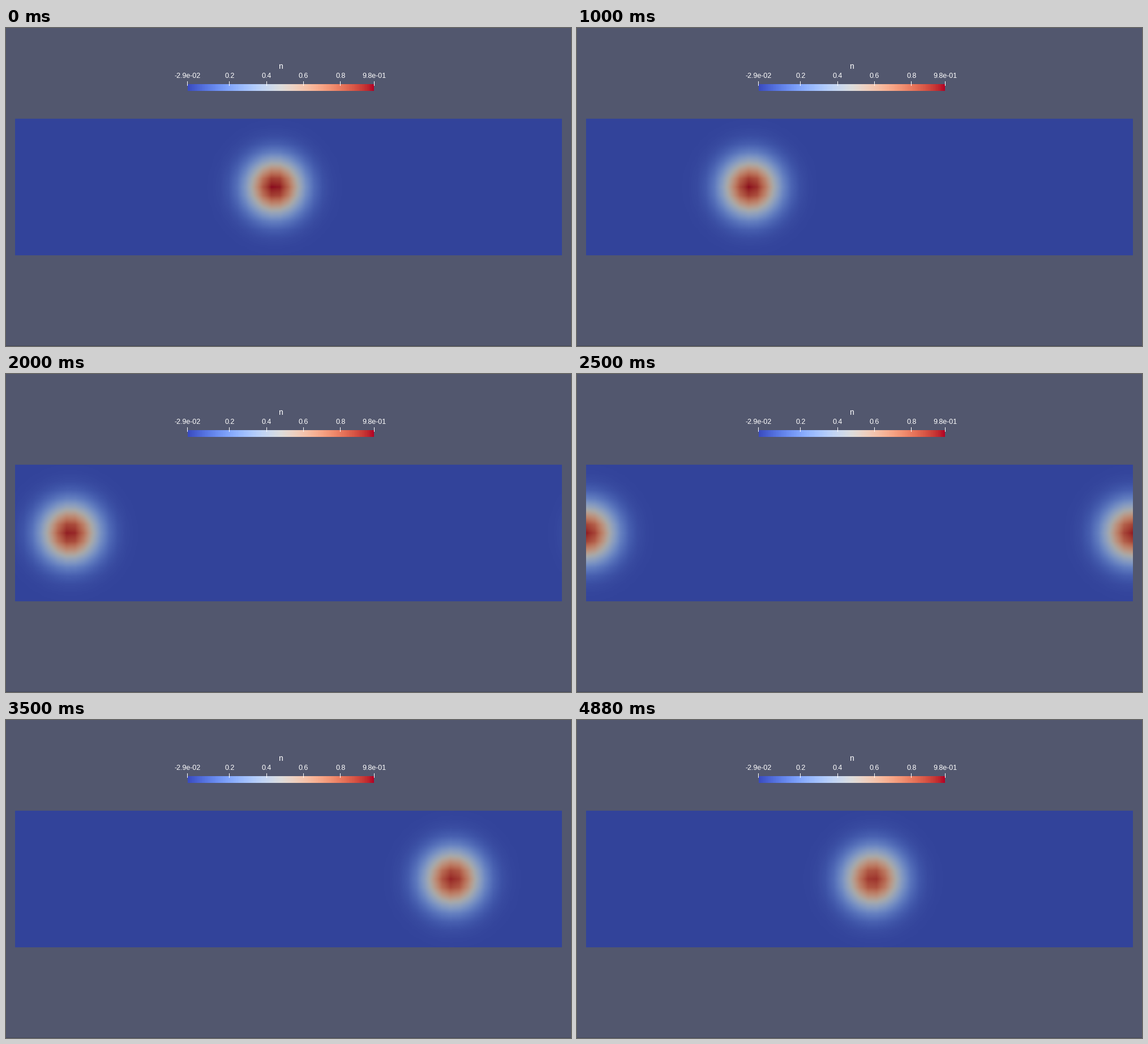
Write a matplotlib script that moves like this. It is 998 by 561 pixels and loops after 5010 ms.

```python
import numpy as np
import matplotlib
import matplotlib.pyplot as plt
from matplotlib.animation import FuncAnimation
from matplotlib.patches import Rectangle

W, H, DPI = 998, 561, 64
FRAMES, LOOP_MS = 40, 5010
VMIN, VMAX = -0.029, 0.984
SHADE = 0.76                      # surface lighting
CMAP = matplotlib.colormaps["coolwarm"]

# Domain in pixels, meshed with 64 x 16 cells
LEFT, TOP, LENGTH, HEIGHT = 16.5, 160.0, 965.0, 241.0
NX = LEFT + np.linspace(0, LENGTH, 65)
NY = TOP + np.linspace(0, HEIGHT, 17)
X0, X1, Y0, Y1 = 16, 982, 160, 401
PX = np.arange(X0, X1) + 0.5
PY = np.arange(Y0, Y1) + 0.5

START_X, MID_Y = 475.0, TOP + HEIGHT / 2
STEP = LENGTH / FRAMES
SIGMA = 34.1

fig = plt.figure(figsize=(W / DPI, H / DPI), dpi=DPI, facecolor="#52576e")
ax = fig.add_axes([0, 0, 1, 1])
ax.set_xlim(0, W)
ax.set_ylim(H, 0)
ax.axis("off")


def field(i):
    """Density pulse carried leftwards through a periodic channel."""
    amp = 0.99 - 0.07 * i / (FRAMES - 1)
    sigma = SIGMA * np.sqrt(0.99 / amp)
    dx = (NX - START_X + STEP * i + LENGTH / 2) % LENGTH - LENGTH / 2
    gx = np.exp(-dx ** 2 / (2 * sigma ** 2))
    gy = np.exp(-(NY - MID_Y) ** 2 / (2 * sigma ** 2))
    # A separable pulse makes bilinear interpolation an outer product
    return amp * np.outer(np.interp(PY, NY, gy), np.interp(PX, NX, gx))


def shade(n):
    return CMAP((n - VMIN) / (VMAX - VMIN))[..., :3] * SHADE


def label(x, y, s, px):
    ax.text(x, y, s, color="white", fontsize=px * 72 / DPI, ha="center",
            va="baseline", family="Liberation Sans")


def color_bar(x0=321, x1=650, y0=99, y1=111):
    ramp = np.linspace(0, 1, x1 - x0)[None, :]
    ax.imshow(CMAP(ramp)[..., :3], extent=(x0, x1, y1, y0),
              interpolation="nearest", aspect="auto")
    label(485, 72, "n", 14)
    ticks = [(VMIN, "-2.9e-02"), (0.2, "0.2"), (0.4, "0.4"),
             (0.6, "0.6"), (0.8, "0.8"), (VMAX, "9.8e-01")]
    for v, s in ticks:
        x = 320.5 + (v - VMIN) / (VMAX - VMIN) * 329.5
        ax.add_patch(Rectangle((int(x), 94), 1, 8, fc="white", lw=0, zorder=3))
        label(x + 0.5, 87.5, s, 12.5)


color_bar()
pulse = ax.imshow(shade(field(0)), extent=(X0, X1, Y1, Y0),
                  interpolation="nearest", aspect="auto")
ax.add_patch(Rectangle((0, H - 1), W, 1, fc="#454a5e", lw=0))
ax.set_xlim(0, W)
ax.set_ylim(H, 0)


def update(i):
    pulse.set_data(shade(field(i)))
    return [pulse]


anim = FuncAnimation(fig, update, frames=FRAMES, interval=LOOP_MS / FRAMES,
                     repeat=True, repeat_delay=0, blit=False)
plt.show()
```
